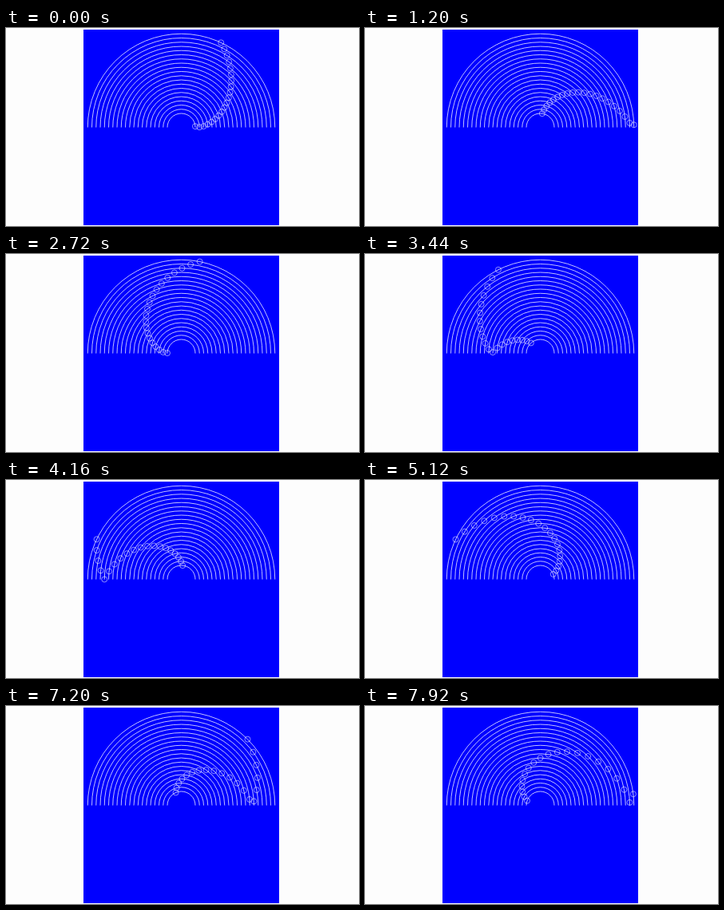
Animation of 442 by 248 pixels, one loop 8000 ms. Source, as an HTML page:

```html
<!DOCTYPE html>
<html lang="en">
<head>
<meta charset="utf-8">
<title>Polyrhythm arcs</title>
<style>
  html, body { margin: 0; width: 100%; height: 100%; overflow: hidden; background: #fdfdfd; }
  svg { display: block; width: 442px; height: 248px; }
  .arc { fill: none; stroke: #fff; stroke-width: .75; }
  .ball { fill: none; stroke: #fff; stroke-width: .55; }
</style>
</head>
<body>
<svg viewBox="0 0 442 248">
  <rect x="97" y="2" width="245" height="245" fill="#00f"/>
  <g id="arcs"></g>
  <g id="balls"></g>
</svg>
<script>
const COUNT = 20, CX = 219.5, CY = 124.5;
const LOOP = 8000, STEP = 80;
const LEAD = 5592;    // ms already run since all balls were aligned
const SPEED = 65.15;  // degrees per second on the innermost arc

const radius = i => 17.5 + 5.25 * i;

function add(parent, tag, attrs) {
  const el = document.createElementNS('http://www.w3.org/2000/svg', tag);
  for (const key in attrs) el.setAttribute(key, attrs[key]);
  document.getElementById(parent).appendChild(el);
  return el;
}

const balls = Array.from({ length: COUNT }, (_, i) => {
  const r = radius(i);
  add('arcs', 'path', { class: 'arc', d: `M${CX - r} ${CY}A${r} ${r} 0 0 1 ${CX + r} ${CY}` });
  return add('balls', 'circle', { class: 'ball', r: 3.5 });
});

function draw(ms) {
  const time = (LEAD + Math.floor(ms / STEP) * STEP) / 1000;
  balls.forEach((ball, i) => {
    // each arc outward is one percent slower; balls bounce at the baseline
    const angle = time * SPEED * (1 - i / 100) * Math.PI / 180;
    ball.setAttribute('cx', CX + radius(i) * Math.cos(angle));
    ball.setAttribute('cy', CY - radius(i) * Math.abs(Math.sin(angle)));
  });
}

const start = performance.now();
function tick() {
  draw((performance.now() - start) % LOOP);
  requestAnimationFrame(tick);
}
tick();
</script>
</body>
</html>
```
